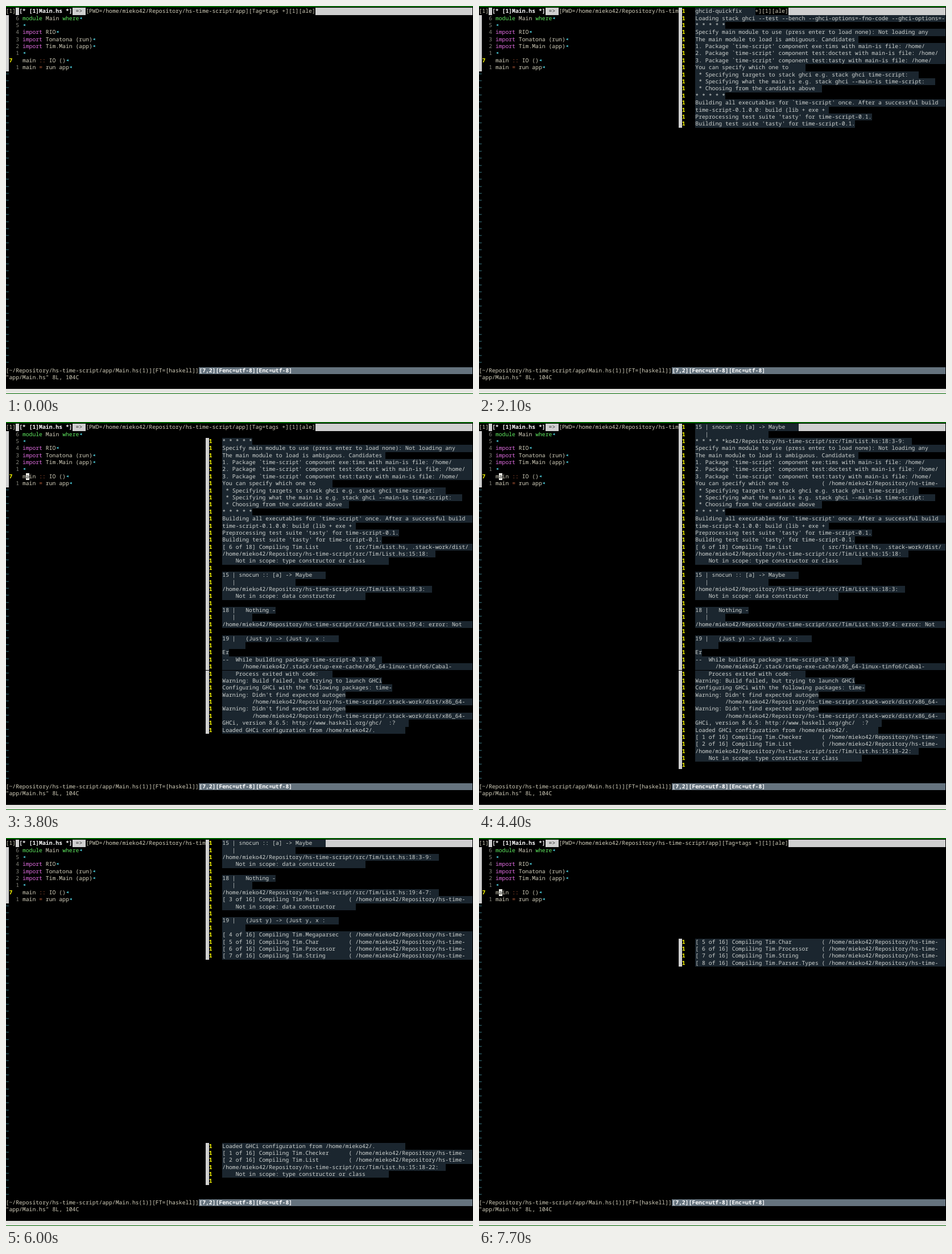
An HTML page that plays this animation: 821x682 px, repeating every 8 s.

```html
<!DOCTYPE html>
<html lang="en">
<head>
<meta charset="utf-8">
<title>Editor with build notifications</title>
<style>
  :root { --w: 5.857px; --h: 12.38px; }
  html, body { margin: 0; width: 100%; height: 100%; overflow: hidden; background: #000; }
  #stage {
    position: relative; width: 821px; height: 682px; overflow: hidden; background: #000;
    color: #d4d0bc; font: 9.762px/var(--h) "Noto Sans Mono", "DejaVu Sans Mono", monospace;
    text-rendering: geometricPrecision; font-variant-ligatures: none;
  }
  .edge { position: absolute; left: 0; width: 100%; background: #006a00; }
  .row {
    position: absolute; display: flex; height: var(--h); white-space: pre;
    left: calc(var(--col) * var(--w) - .4px); top: calc(3.2px + var(--row) * var(--h));
  }
  .row > span { flex: none; height: var(--h); }
  .light { background: #d0d0d0; color: #303030; }
  .tab { background: #000; color: #fff; font-weight: bold; }
  .status { background: #65737e; color: #fff; font-weight: bold; }
  .num { color: #85857c; }
  .current { background: #000; color: #ff0; font-weight: bold; }
  .key { color: #5fe85f; }
  .import { color: #e46ee4; }
  .op { color: #c4633c; }
  .eol { color: #48c4d2; font-family: "DejaVu Sans Mono", monospace; }
  .tilde { color: #4fb0c2; position: relative; top: -1px; }
  .cursor { background: #f2f2ea; color: #222; }
  .note { background: #1b262f; color: #cfd3d0; }
</style>
</head>
<body>
<div id="stage">
  <div class="edge" style="top:0;height:2px"></div>
  <div class="edge" style="top:673px;height:8px;background:#e6e6e2"></div>
  <div class="edge" style="top:681px;height:1px"></div>
  <div id="editor"></div>
  <div id="notes"></div>
</div>
<script>
const LOOP = 8000, COLS = 140, FULL = 75;
const editor = document.getElementById('editor');
const notes = document.getElementById('notes');
const timed = [];

// Each part is [class, text, cells]; cells sets the width of the coloured box.
function makeRow(row, col, ...parts) {
  const line = document.createElement('div');
  line.className = 'row';
  line.style.setProperty('--row', row);
  line.style.setProperty('--col', col);
  for (const [name, text, cells = text.length] of parts) {
    const span = document.createElement('span');
    span.className = name;
    span.textContent = text;
    span.style.width = `calc(${cells} * var(--w))`;
    line.append(span);
  }
  return line;
}
const put = (...args) => {
  const line = makeRow(...args);
  editor.append(line);
  return line;
};

const home = '/home/mieko42/';
const repo = home + 'Repository/hs-time-script/';

// Tab line, status line and message
put(0, 0, ['', '[1]'], ['light', ' '], ['tab', '[* [1]Main.hs *]'], ['light', ' => '],
  ['', `[PWD=${repo}app][Tag=tags +][1][ale]`], ['light', '', COLS - 93]);
put(51, 0, ['', '[~/Repository/hs-time-script/app/Main.hs(1)][FT=[haskell]]'],
  ['status', '[7,2][Fenc=utf-8][Enc=utf-8]', COLS - 58]);
put(52, 0, ['', '"app/Main.hs" 8L, 104C']);

// Source buffer
const code = [
  [['key', 'module'], ['', ' Main '], ['key', 'where']],
  [],
  [['import', 'import'], ['', ' RIO']],
  [['import', 'import'], ['', ' Tonatona (run)']],
  [['import', 'import'], ['', ' Tim.Main (app)']],
  [],
  [['', 'main '], ['op', '::'], ['', ' IO ()']],
  [['', 'main '], ['op', '='], ['', ' run app']],
];
code.forEach((parts, i) => {
  const number = i === 6 ? ['current', '7   '] : ['num', `  ${Math.abs(6 - i)} `];
  put(i + 1, 0, ['light', ' '], number, ...parts, ['eol', '◂']);
});
for (let row = 9; row <= 50; row++) put(row, 0, ['tilde', '~']);

const cursor = put(7, 6, ['cursor', 'a']);
const cursorOn = [[400, 1500], [1700, 2000], [2400, 3500], [3800, 4100], [4400, 6000], [6500, LOOP]];
timed.push({ el: cursor, spans: cursorOn });

// Floating notifications, one window per line; earlier ones stay on top.
function notify(from, to, row, lines) {
  lines.forEach(([text, cells = text.length], i) => {
    const el = makeRow(row + i, 60, ['light', ' '], ['current', '1   '], ['note', text, cells]);
    notes.prepend(el);
    timed.push({ el, spans: [[from, to]] });
  });
}
const compiling = (step, name) =>
  [`[ ${step} of 16] Compiling ${name.padEnd(17)}( ${home}Repository/hs-time-`, FULL];
const listFile = (place, cells) => [`${repo}src/Tim/List.hs:${place}`, cells];
const noType = ['    Not in scope: type constructor or class', 50];
const noData = cells => ['    Not in scope: data constructor', cells];
const stars = ['* * * * *'];
const blank = [''];
const snocun = ['15 | snocun :: [a] -> Maybe', 31];
const pipe = cells => ['   |', cells];
const nothing = ['18 |   Nothing -'];
const just = ['19 |   (Just y) -> (Just y, x :', 35];
const gap = ['', 7];
const candidate = (n, name) =>
  [`${n}. Package \`time-script' component ${name} with main-is file: /home/`, FULL];
const autogen = [
  ["Warning: Didn't find expected autogen"],
  [`         ${repo}.stack-work/dist/x86_64-`, FULL],
];

notify(800, 3800, 0, [['ghcid-quickfix', 18]]);
notify(900, 3800, 1, [
  ['Loading stack ghci --test --bench --ghci-options=-fno-code --ghci-options=-'],
]);
notify(1500, 4800, 2, [
  stars,
  ['Specify main module to use (press enter to load none): Not loading any', FULL],
  ['The main module to load is ambiguous. Candidates', 49],
  candidate(1, 'exe:tims'),
]);
notify(1600, 4800, 6, [
  candidate(2, 'test:doctest'),
  candidate(3, 'test:tasty'),
  ['You can specify which one to', 33],
  [' * Specifying targets to stack ghci e.g. stack ghci time-script:', 67],
]);
notify(1700, 4800, 10, [
  [' * Specifying what the main is e.g. stack ghci --main-is time-script:', 72],
  [' * Choosing from the candidate above', 38],
  stars,
]);
notify(2000, 5300, 13, [
  ["Building all executables for `time-script' once. After a successful build", FULL],
  ['time-script-0.1.0.0: build (lib + exe +', 40],
]);
notify(2100, 5300, 15, [
  ["Preprocessing test suite 'tasty' for time-script-0.1."],
  ["Building test suite 'tasty' for time-script-0.1."],
]);
notify(2400, 6000, 17, [
  ['[ 6 of 18] Compiling Tim.List         ( src/Tim/List.hs, .stack-work/dist/', FULL],
  listFile('15:18:', 64), noType, blank, snocun, pipe(22),
  listFile('18:3:', 63), noData(43), blank, nothing, pipe(9),
]);
notify(2500, 6000, 28, [
  listFile('19:4: error: Not', FULL), blank, just, gap,
  ['Er'],
  ['--  While building package time-script-0.1.0.0', 48],
  [`      ${home}.stack/setup-exe-cache/x86_64-linux-tinfo6/Cabal-`, FULL],
  ['    Process exited with code:', 33],
  ['Warning: Build failed, but trying to launch GHCi'],
]);
notify(3100, 6000, 37, [
  ['Configuring GHCi with the following packages: time-'],
  ...autogen, ...autogen,
  ['GHCi, version 8.6.5: http://www.haskell.org/ghc/  :?', 56],
]);
notify(3500, 6500, 43, [[`Loaded GHCi configuration from ${home}.`, 55]]);
notify(4100, 6900, 44, [
  compiling(1, 'Tim.Checker'), compiling(2, 'Tim.List'),
  listFile('15:18-22:', 67), noType, blank,
]);
notify(4100, 6900, 0, [
  snocun, pipe(22), listFile('18:3-9:', 65), noData(43), blank,
  nothing, pipe(9), listFile('19:4-7:', 65), compiling(3, 'Tim.Main'), noData(40), blank,
  just, gap,
]);
notify(4800, 7700, 13, [compiling(4, 'Tim.Megaparsec')]);
notify(4800, LOOP, 14, [compiling(5, 'Tim.Char')]);
notify(6000, LOOP, 15, [compiling(6, 'Tim.Processor'), compiling(7, 'Tim.String')]);
notify(6900, LOOP, 17, [compiling(8, 'Tim.Parser.Types')]);

function draw() {
  const t = performance.now() % LOOP;
  for (const { el, spans } of timed) {
    const shown = spans.some(([from, to]) => t >= from && t < to);
    el.style.visibility = shown ? 'visible' : 'hidden';
  }
  requestAnimationFrame(draw);
}
draw();
</script>
</body>
</html>
```
